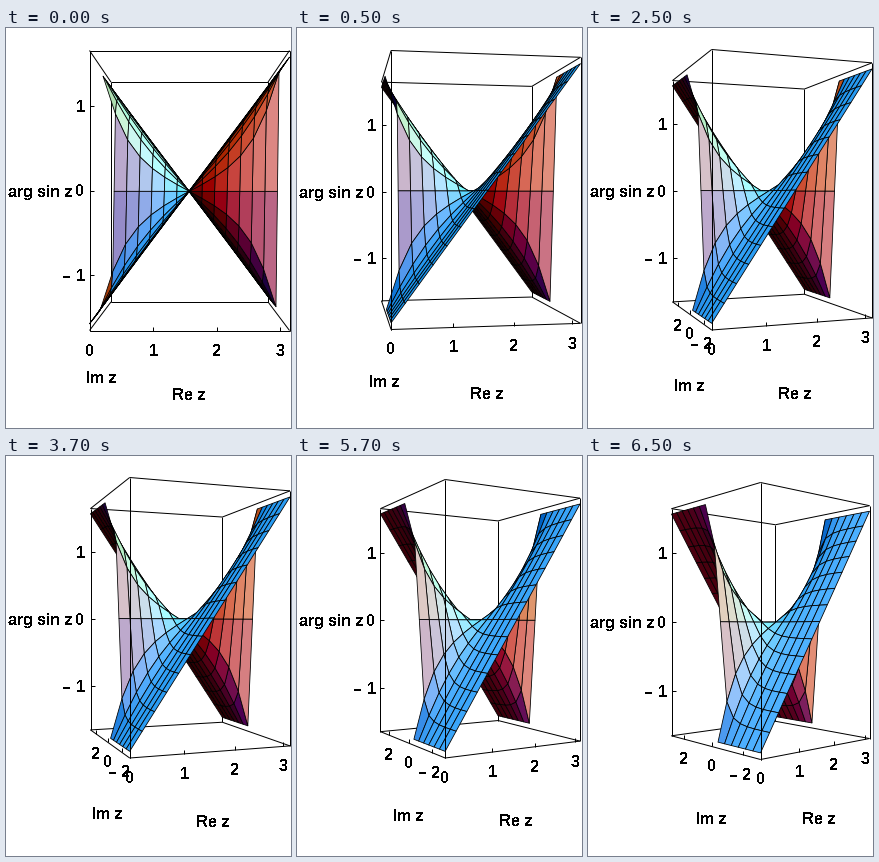
These frames come from a looping animation (285x400 px, 8 s). A matplotlib script:

```python
import numpy as np
import matplotlib.pyplot as plt
from matplotlib.animation import FuncAnimation
from matplotlib.collections import LineCollection, PolyCollection

plt.rcParams.update({
    "font.family": "Liberation Sans",
    "font.weight": "bold",
    "text.antialiased": False,
    "text.hinting": "native",
    "text.hinting_factor": 1,
})

WIDTH, HEIGHT, DPI = 285, 400, 100
PX = 72 / DPI
STEP_MS, LOOP_MS = 500, 8000
CAMERA = 4.15          # distance from the centre of the unit box
CAMERA_Z = -0.025
Y_MAX, Z_MAX = 3, 1.05 * np.pi / 2

# angle, left, right, top and bottom of the box, "Im z" and "Re z" centres
VIEWS = [
    (0.0, 83, 283, 22, 302, (95.5, 349), (183, 366)),
    (10.0, 84, 283, 22, 301, (88, 353), (190, 365)),
    (20.5, 84, 283.5, 21, 301.5, (101, 357), (207, 365)),
    (30.5, 83, 282.5, 23, 301.5, (112, 359), (219.5, 364)),
    (40.8, 83, 281, 26, 303, (123, 362), (231.5, 362)),
]

# light response per colour channel: ambient, then right, up, towards the viewer
AMBIENT = np.array([0.32, 0.335, 0.42])
LIGHT = np.array([[0.40, 0.32, 0.00],
                  [0.00, 0.60, 0.65],
                  [0.42, 0.20, 0.25]])


def to_box(x, y, z):
    """Data coordinates to a unit cube centred on the origin."""
    return np.stack(np.broadcast_arrays(x / np.pi - 0.5, y / (2 * Y_MAX),
                                        z / (2 * Z_MAX)), axis=-1)


def make_cells(n=7):
    x, y = np.meshgrid(np.pi * np.arange(2 * n + 1) / (2 * n),
                       Y_MAX * np.arange(-n, n + 1) / n, indexing="ij")
    grid = to_box(x, y, np.angle(np.sin(x + 1j * y)))
    cells = [[grid[i, j], grid[i + 1, j], grid[i + 1, j + 1], grid[i, j + 1]]
             for i in range(2 * n) for j in range(2 * n)
             if not (i == 0 and j in (n - 1, n))]   # arg 0 is undefined
    return np.array(cells)


CELLS = make_cells()
CORNERS = np.array([(x, y, z) for x in (-.5, .5) for y in (-.5, .5)
                    for z in (-.5, .5)])
EDGES = [(p, q) for i, p in enumerate(CORNERS) for q in CORNERS[i + 1:]
         if np.sum(p != q) == 1]


class View:
    def __init__(self, angle, left, right, top, bottom, im_pos, re_pos):
        s, c = np.sin(np.radians(angle)), np.cos(np.radians(angle))
        self.axes = np.array([[c, -s, 0], [0, 0, 1], [-s, -c, 0]])
        self.im_pos, self.re_pos = im_pos, re_pos
        self.side_visible = CAMERA * s > 0.5

        lateral = self.flat(CORNERS)[:, 0]
        self.scale_x = (right - left) / np.ptp(lateral)
        self.x0 = left - self.scale_x * lateral.min()
        near_top = self.flat(np.array([-.5, -.5, .5]))[1]
        near_bottom = self.flat(np.array([-.5, -.5, -.5]))[1]
        self.scale_y = (bottom - top) / (near_top - near_bottom)
        self.y0 = top + self.scale_y * near_top

    def flat(self, points):
        cam = points @ self.axes.T
        depth = CAMERA - cam[..., 2]
        return np.stack([cam[..., 0] / depth,
                         (cam[..., 1] - CAMERA_Z) / depth], axis=-1)

    def project(self, points):
        u = self.flat(points)
        return np.stack([self.x0 + self.scale_x * u[..., 0] + 0.5,
                         self.y0 - self.scale_y * u[..., 1] + 0.5], axis=-1)

    def point(self, x, y, z):
        return self.project(to_box(x, y, z))

    def surface(self):
        cam = CELLS @ self.axes.T
        eye = np.array([0, CAMERA_Z, CAMERA])
        centre = cam.mean(axis=1)
        # each cell is lit by the triangle at its first corner
        normal = np.cross(cam[:, 1] - cam[:, 0], cam[:, 3] - cam[:, 0])
        normal /= np.linalg.norm(normal, axis=1, keepdims=True)
        facing = np.sum(normal * (eye - centre), axis=1)
        normal *= np.where(facing < 0, -1, 1)[:, None]
        colors = np.clip(AMBIENT + normal @ LIGHT, 0, 1)
        order = np.argsort(-np.linalg.norm(eye - centre, axis=1))
        return self.project(CELLS)[order], colors[order]

    def box(self):
        front, back = [], []
        for p, q in EDGES:
            is_front = (p[1] == q[1] == -.5
                        or self.side_visible and p[0] == q[0] == -.5)
            (front if is_front else back).append(self.project(np.array([p, q])))
        return front, back


views = [View(*v) for v in VIEWS]

fig = plt.figure(figsize=(WIDTH / DPI, HEIGHT / DPI), dpi=DPI, facecolor="white")
ax = fig.add_axes([0, 0, 1, 1])


def lines(segments, zorder):
    ax.add_collection(LineCollection(segments, colors="black", linewidths=PX,
                                     zorder=zorder))


def text(x, y, s, ha="center"):
    ax.text(x, y + 6, s, ha=ha, va="baseline", fontsize=16 * PX, zorder=5)


def number(x, y, n):
    text(x, y, str(abs(n)))
    if n < 0:
        text(x - 13, y, "\u2212")


def draw_axes(view):
    ticks = []
    axis_y = Y_MAX if view.side_visible else -Y_MAX
    for n in (-1, 0, 1):
        x, y = view.point(0, axis_y, n)
        ticks.append([(x, y), (x + 4, y)])
        number(74, y, n)
    for n in range(4):
        x, y = view.point(n, -Y_MAX, -Z_MAX)
        ticks.append([(x, y), (x, y - 4)])
        number(x, y + 19, n)
    if view.im_pos[0] > 100:
        for n in (-2, 0, 2):
            x, y = view.point(0, n, -Z_MAX)
            ticks.append([(x, y), (x, y - 4)])
            number(x + (4 if n < 0 else 0), y + 19, n)
    lines(ticks, 4)
    text(2, view.point(0, axis_y, 0)[1], "arg sin z", ha="left")
    text(*view.im_pos, "Im z")
    text(*view.re_pos, "Re z")


def update(frame):
    view = views[(frame * STEP_MS + 1500) // 2000]
    ax.clear()
    ax.set_xlim(0, WIDTH)
    ax.set_ylim(HEIGHT, 0)
    ax.axis("off")
    front, back = view.box()
    lines(back, 1)
    cells, colors = view.surface()
    ax.add_collection(PolyCollection(cells, facecolors=colors, edgecolors="black",
                                     linewidths=0.8 * PX, joinstyle="round",
                                     zorder=2))
    lines(front, 3)
    draw_axes(view)
    return []


anim = FuncAnimation(fig, update, frames=LOOP_MS // STEP_MS, interval=STEP_MS,
                     init_func=lambda: [], repeat=True, repeat_delay=0)
plt.show()
```
